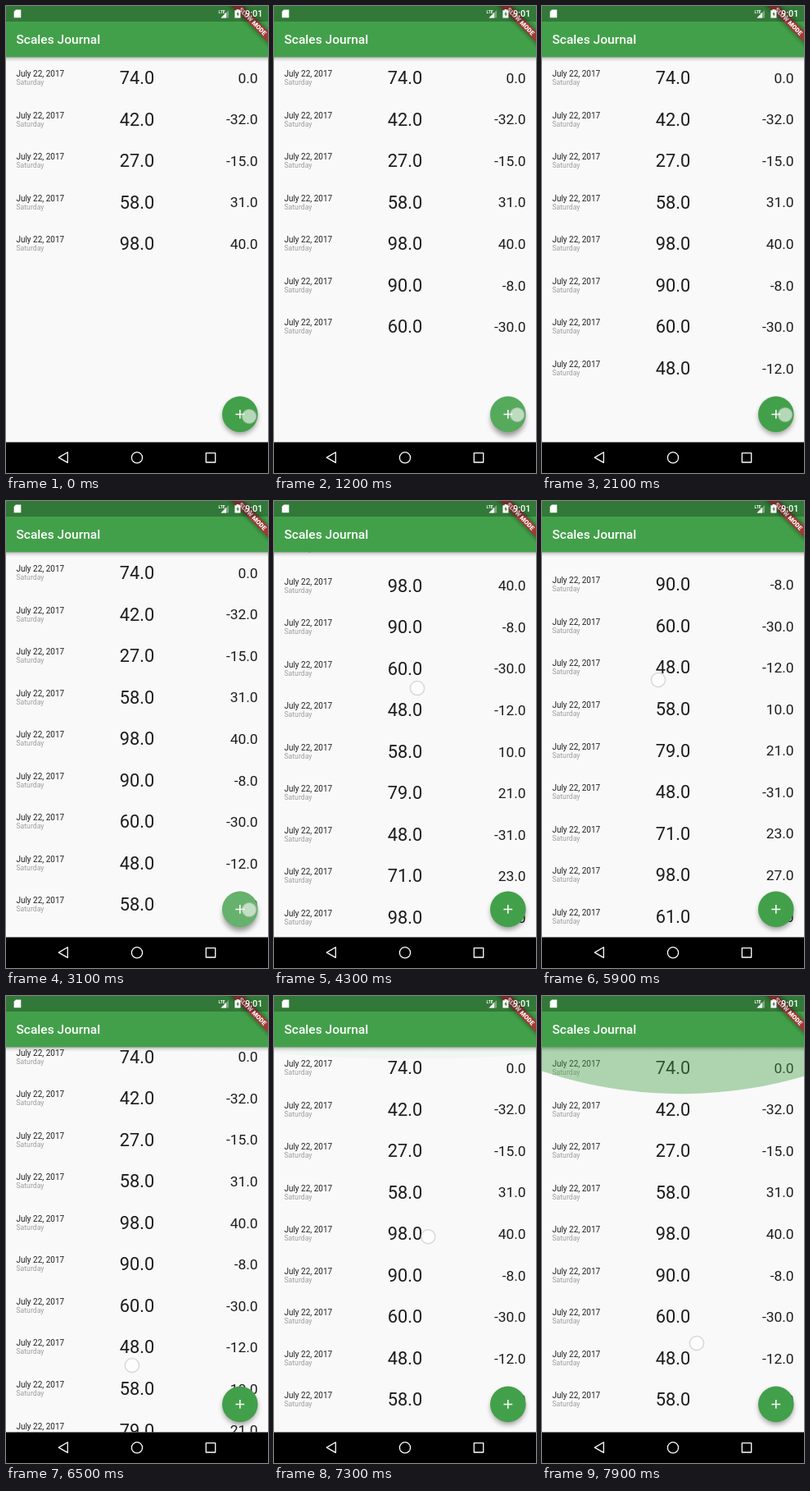
An HTML page for the animation above (8000 ms loop, 320x569 px).

```html
<!DOCTYPE html>
<html lang="en">
<head>
<meta charset="utf-8">
<title>Scales Journal</title>
<style>
html, body { margin: 0; width: 100%; height: 100%; overflow: hidden; background: #000; }
svg { display: block; width: 100vw; height: 100vh; font-family: Roboto, sans-serif; }
.date { font-size: 10px; fill: #222; }
.day { font-size: 8.7px; fill: #9e9e9e; }
.weight { font-size: 21.8px; fill: #1c1c1c; text-anchor: middle; }
.diff { font-size: 17.4px; fill: #1c1c1c; text-anchor: end; }
</style>
</head>
<body>
<svg viewBox="0 0 320 569" xmlns="http://www.w3.org/2000/svg">
  <defs>
    <clipPath id="view"><rect y="62" width="320" height="469.5"/></clipPath>
    <clipPath id="fabClip"><circle cx="285.8" cy="497.4" r="21.8"/></clipPath>
    <linearGradient id="barShade" x2="0" y2="1">
      <stop offset="0" stop-opacity=".32"/>
      <stop offset=".4" stop-opacity=".12"/>
      <stop offset="1" stop-opacity="0"/>
    </linearGradient>
    <filter id="soft" x="-50%" y="-50%" width="200%" height="200%"><feGaussianBlur stdDeviation="3"/></filter>
  </defs>

  <rect width="320" height="569" fill="#f9f9f9"/>
  <g clip-path="url(#view)">
    <g id="list"></g>
    <path id="low" fill="#43a047"/>
    <path id="high" fill="#43a047"/>
    <rect y="62" width="320" height="6" fill="url(#barShade)"/>
    <circle id="shade" cx="285.8" cy="501" r="21" opacity=".38" filter="url(#soft)"/>
    <circle cx="285.8" cy="497.4" r="21.8" fill="#43a04a"/>
    <g clip-path="url(#fabClip)"><circle id="ripple" cx="285.8" cy="497.4" fill="#fff"/></g>
    <path d="M280.4 497.4h10.8M285.8 492v10.8" stroke="#fff" stroke-width="1.5"/>
  </g>

  <rect width="320" height="62.2" fill="#43a04a"/>
  <text x="12.4" y="46.2" font-size="15.56" font-weight="500" fill="#fff">Scales Journal</text>

  <g transform="translate(320 0) rotate(45)">
    <rect x="-45" y="21.8" width="90" height="9.4" opacity=".5" filter="url(#soft)"/>
    <rect x="-45" y="21.8" width="90" height="9.4" fill="#a03a35"/>
    <text y="29.2" font-size="7.7" font-weight="900" fill="#fff" text-anchor="middle">SLOW MODE</text>
  </g>

  <rect width="320" height="19" opacity=".25"/>
  <g fill="#fff">
    <path d="M12 4.5h6.3v9.8h-8.6v-7.5z"/>
    <text x="259.5" y="9" font-size="5" font-weight="700">LTE</text>
    <path d="M272 5v9.5h-9.5z" opacity=".35"/>
    <path d="M269 8v6.5h-6.5z"/>
    <path d="M281.6 4h2.6v1.2h2.2v9.3h-7v-9.3h2.2z"/>
    <path d="M283.5 6.6l-2.2 3.6h1.4v2.7l2.2-3.7h-1.4z" fill="#357d3b"/>
    <text x="313.5" y="13.4" font-size="10.9" font-weight="500" text-anchor="end">9:01</text>
  </g>

  <rect y="531.5" width="320" height="37.5"/>
  <g fill="none" stroke="#fff" stroke-width="1.3" stroke-linejoin="round">
    <path d="M75.3 543.8v12.6l-11-6.3z"/>
    <circle cx="160" cy="550.3" r="6.6"/>
    <rect x="244.3" y="544.6" width="11.4" height="11.4"/>
  </g>
  <circle id="finger" r="8.6" fill="#fff" fill-opacity=".6" stroke="#b8b8b8" stroke-opacity=".5" stroke-width="1.5"/>
</svg>
<script>
const LOOP = 8000, TICK = 100, ROW = 50.55, TOP = 62.2, BOTTOM = 531.5;
const weights = [74, 42, 27, 58, 98, 90, 60, 48, 58, 79, 48, 71, 98, 61];
const END = weights.length * ROW - (BOTTOM - TOP);

// Button presses: [down, up]; each release adds a row
const taps = [[0, 300], [600, 800], [1100, 1700], [2100, 2300], [2600, 2800],
  [3000, 3200], [3400, 3500], [3600, 3700], [3800, 3900]];

// Drags: points of [time, x, y]
const drags = [
  [[4300, 175, 228], [4500, 169, 206]],
  [[4800, 150, 340], [5100, 137, 300], [5300, 137, 298]],
  [[5900, 142, 218], [6500, 154, 450], [6700, 156, 466]],
  [[7100, 188, 250], [7900, 189, 423]]
];
const scroll = [[0, 0], [4299, 0], [4300, 186.6], [4400, 203], [4500, 209], [4700, 209],
  [4900, END], [5900, END], [6500, 13.4], [6700, 0]];
const lowGlow = [[4800, 0], [5100, .66], [5200, .66], [5700, 0]];
const highGlow = [[7100, 0], [7900, .89]];

const $ = id => document.getElementById(id);
const set = (el, attrs) => { for (const k in attrs) el.setAttribute(k, attrs[k]); };

function at(keys, t, col = 1) {
  if (t <= keys[0][0]) return keys[0][col];
  for (let i = 1; i < keys.length; i++) {
    const a = keys[i - 1], b = keys[i];
    if (t <= b[0]) return a[col] + (b[col] - a[col]) * (t - a[0]) / (b[0] - a[0]);
  }
  return keys[keys.length - 1][col];
}

function label(parent, cls, x, y, text) {
  const el = document.createElementNS("http://www.w3.org/2000/svg", "text");
  set(el, { class: cls, x, y });
  el.textContent = text;
  parent.append(el);
}

const rows = weights.map((w, i) => {
  const g = document.createElementNS("http://www.w3.org/2000/svg", "g");
  set(g, { transform: `translate(0 ${TOP + i * ROW})` });
  label(g, "date", 12.4, 23.8, "July 22, 2017");
  label(g, "day", 12.4, 33.8, "Saturday");
  label(g, "weight", 160, 32.8, w.toFixed(1));
  label(g, "diff", 307.6, 31.6, (i ? w - weights[i - 1] : 0).toFixed(1));
  $("list").append(g);
  return g;
});

// Overscroll arc: a wide circle squashed by the pull
function glow(el, edge, dir, size, cx) {
  const r = 480, peak = 64 * size, sag = x => (r - Math.sqrt(r * r - (x - cx) ** 2)) * size;
  const y = x => edge + dir * (peak - sag(x));
  set(el, {
    d: `M0 ${edge}V${y(0)}A${r} ${r * size} 0 0 ${dir < 0 ? 1 : 0} 320 ${y(320)}V${edge}z`,
    opacity: .48 * size * size + .045 * size,
    visibility: size > .01 ? "visible" : "hidden"
  });
}

function draw(now) {
  const t = Math.floor(now % LOOP / TICK) * TICK;
  const count = 5 + taps.filter(p => t >= p[1]).length;
  rows.forEach((g, i) => set(g, { visibility: i < count ? "visible" : "hidden" }));
  set($("list"), { transform: `translate(0 ${-at(scroll, t)})` });
  glow($("low"), BOTTOM, -1, at(lowGlow, t), 160);
  glow($("high"), TOP, 1, at(highGlow, t), 170);

  const tap = taps.find(p => t >= p[0] && t < p[1]);
  const held = tap ? t - tap[0] : 0;
  set($("ripple"), { r: Math.min(24, held * .24), opacity: tap ? (t > 2000 ? .19 : .1) : 0 });
  set($("shade"), { cy: held ? 503 : 501 });

  const drag = drags.find(d => t >= d[0][0] && t <= d[d.length - 1][0]);
  set($("finger"), {
    cx: drag ? at(drag, t, 1) : 297,
    cy: drag ? at(drag, t, 2) : t < 300 ? 500 : 498,
    visibility: tap || drag ? "visible" : "hidden"
  });
}

const start = performance.now();
function loop() {
  draw(performance.now() - start);
  requestAnimationFrame(loop);
}
loop();
</script>
</body>
</html>
```
